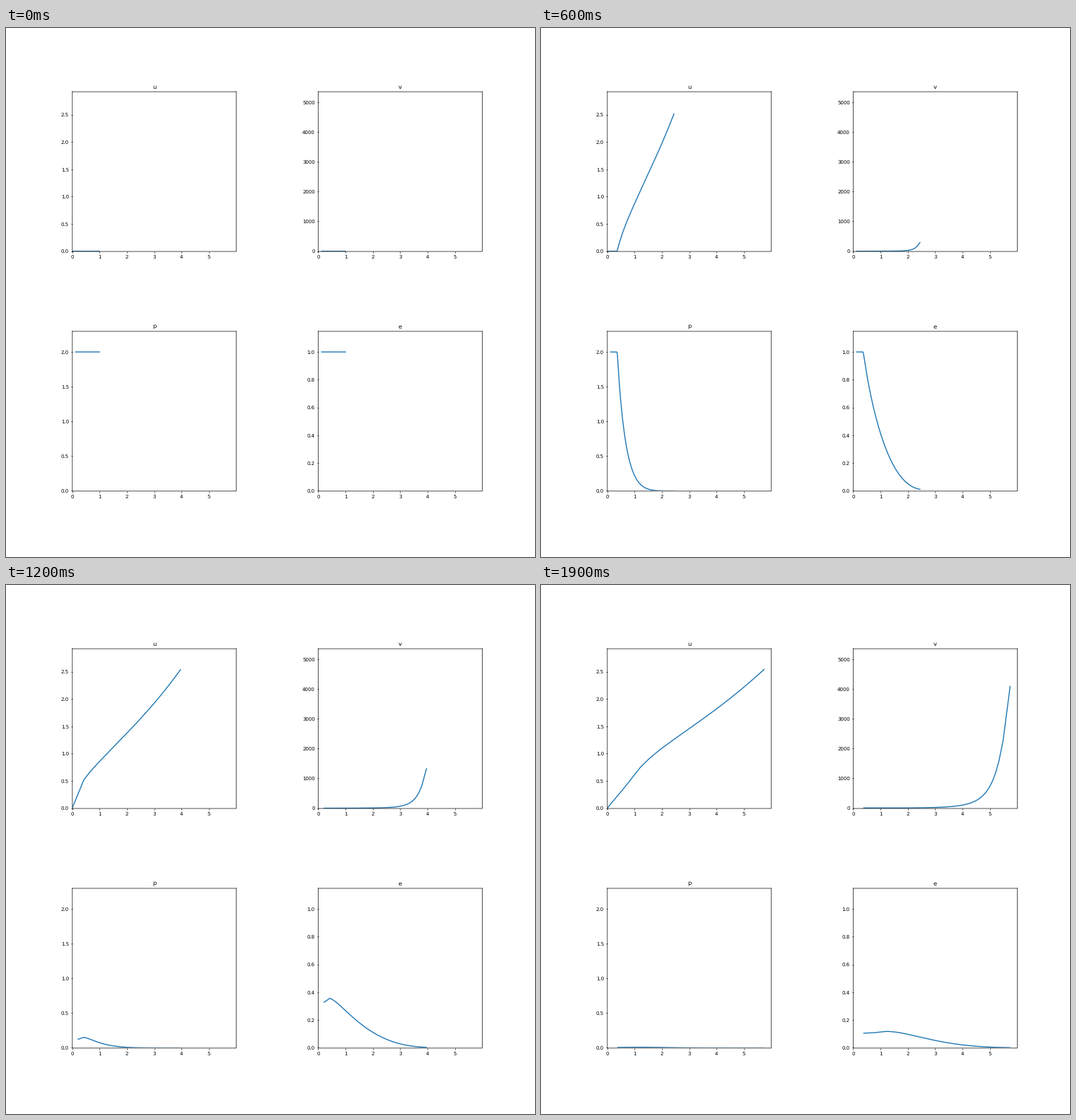
A matplotlib script that plays this animation: 748x748 px, repeating every 2000 ms.

```python
import numpy as np
import matplotlib.pyplot as plt
from matplotlib.animation import FuncAnimation

# Free expansion of a gas ball into vacuum, on a spherical Lagrangian mesh
GAMMA = 5 / 3
CELLS = 500
DM = 1 / CELLS
V0, E0 = 1 / 3, 1.0

FRAMES = 20
INTERVAL = 100
FRAME_TIME = 0.1
SUBSTEPS = 400
DT = FRAME_TIME / SUBSTEPS


def cell_state(r):
    v = np.diff(r**3) / (3 * DM)
    e = E0 * (V0 / v) ** (GAMMA - 1)
    return v, (GAMMA - 1) * e / v, e


def simulate():
    r = (np.arange(CELLS + 1) / CELLS) ** (1 / 3)
    u = np.zeros(CELLS + 1)
    states = []
    for _ in range(FRAMES + 1):
        states.append((r.copy(), u.copy(), *cell_state(r)))
        for _ in range(SUBSTEPS):
            p = cell_state(r)[1]
            # outside pressure is zero, the centre node stays at rest
            u[1:] -= DT * r[1:] ** 2 * np.diff(p, append=0) / DM
            r += DT * u
    return states


states = simulate()
x_max = states[-1][0][-1]

plt.rcParams.update({
    "font.family": "DejaVu Sans",
    "text.hinting": "none",
    "axes.linewidth": 1.0,
    "xtick.major.width": 1.0,
    "ytick.major.width": 1.0,
})
fig, axes = plt.subplots(2, 2, figsize=(14.96, 14.96), dpi=50, facecolor="white")
fig.subplots_adjust(left=0.125, right=0.9, bottom=0.125, top=0.88,
                    wspace=0.5, hspace=0.5)

# half a point right and down for every side of the box
SPINE_SHIFT = {"left": -0.5, "right": 0.5, "top": -0.5, "bottom": 0.5}

panels = [("u", 0.5), ("v", 1000), ("p", 0.5), ("e", 0.2)]
lines = []
for k, (ax, (name, step)) in enumerate(zip(axes.flat, panels), start=1):
    top = 1.15 * max(state[k].max() for state in states)
    for side, shift in SPINE_SHIFT.items():
        ax.spines[side].set_position(("outward", shift))
        ax.spines[side].set_snap(False)
    ax.set_title(name, fontsize=12)
    ax.set_xticks(range(6))
    ax.set_yticks(np.arange(0, top, step))
    ax.set_xlim(0, x_max)
    ax.set_ylim(0, top)
    lines += ax.plot([], [], lw=2, color="#1f77b4", snap=False)


def draw(i):
    r, u, *cells = states[i]
    lines[0].set_data(r, u)
    for line, values in zip(lines[1:], cells):
        line.set_data(r[1:], values)
    return lines


anim = FuncAnimation(fig, draw, frames=FRAMES, init_func=lambda: draw(0),
                     interval=INTERVAL, repeat=True, repeat_delay=0)
plt.show()
```
